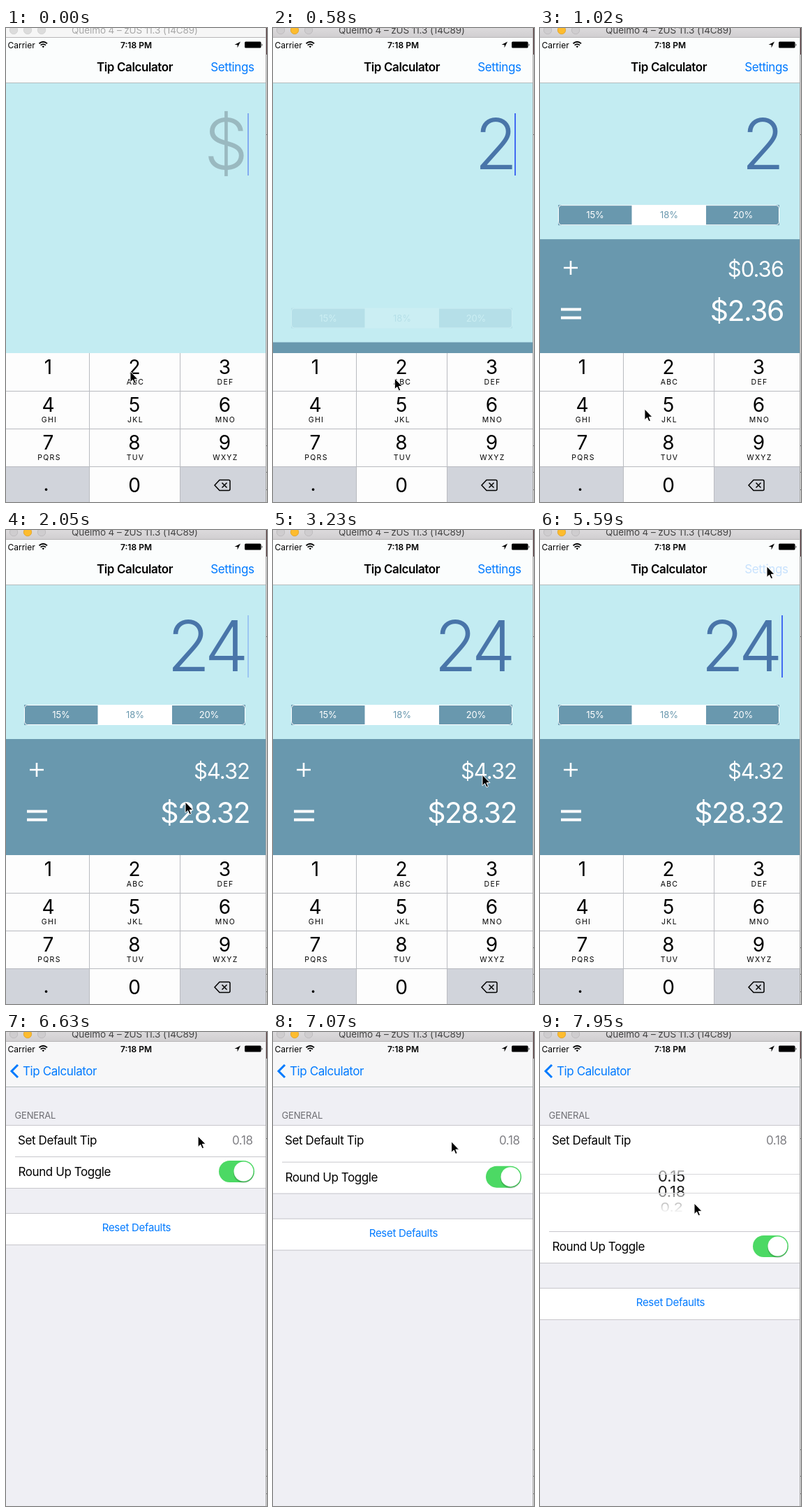
An HTML page that plays this animation: 374 px wide and 678 px high, repeating every 8 s.

```html
<!DOCTYPE html>
<html lang="en">
<head>
<meta charset="utf-8">
<title>Tip Calculator</title>
<style>
  html, body { margin: 0; width: 100%; height: 100%; overflow: hidden; background: #fff; }
  svg { display: block; width: 374px; height: 678px; }
  text {
    font-family: Inter, Roboto, "Liberation Sans", sans-serif;
    font-size: 17px; letter-spacing: -.41px;
    font-optical-sizing: none; white-space: pre;
  }
  .mid { text-anchor: middle; }
  .end { text-anchor: end; }
  .bold { font-weight: 600; }
  .blue { fill: #007aff; }
  .small { font-size: 12px; letter-spacing: 0; }
  .bar { font-size: 13.5px; letter-spacing: -.1px; }
  .bill { font-size: 100px; letter-spacing: -6px; font-weight: 350; fill: #4975a9; }
  .seg { font-size: 13px; letter-spacing: -.1px; fill: #fff; }
  .tip { font-size: 31px; letter-spacing: -1px; fill: #fff; }
  .total { font-size: 41px; letter-spacing: -1.5px; fill: #fff; }
  .digit { font-size: 28px; letter-spacing: 0; }
  .abc { font-size: 10.5px; letter-spacing: 1.3px; }
  .head { font-size: 13px; letter-spacing: -.15px; fill: #6d6d72; }
  .reset { font-size: 15px; letter-spacing: -.3px; }
  .wheel text { font-size: 22px; letter-spacing: -.2px; text-anchor: middle; }
  .hair { stroke: #c8c7cc; }
</style>
</head>
<body>
<svg viewBox="0 0 374 678">
  <defs>
    <clipPath id="screen"><rect y="14" width="372" height="664"/></clipPath>
    <clipPath id="panelClip"><rect id="panelMask" y="299" width="372" height="379"/></clipPath>
    <clipPath id="band"><rect y="204" width="372" height="27"/></clipPath>
    <linearGradient id="fadeTop" x2="0" y2="1">
      <stop offset=".3" stop-color="#fff"/><stop offset="1" stop-color="#fff" stop-opacity=".1"/>
    </linearGradient>
    <linearGradient id="fadeLow" x2="0" y2="1">
      <stop offset="0" stop-color="#fff" stop-opacity=".1"/><stop offset="1" stop-color="#fff"/>
    </linearGradient>
    <linearGradient id="chrome" x2="0" y2="1">
      <stop offset="0" stop-color="#dcdadc"/><stop offset="1" stop-color="#d0ced0"/>
    </linearGradient>
  </defs>

  <g clip-path="url(#screen)">
    <g id="calc">
      <rect y="79" width="372" height="599" fill="#c3ecf2"/>
      <text id="hint" class="bill end" x="341" y="202" style="fill:#9ab9c0">$</text>
      <text id="bill" class="bill" y="202"></text>
      <rect id="caret" x="346" y="122" width="2" height="89" fill="#426bf2"/>
      <g id="result">
        <rect id="panel" y="299" width="372" height="379" fill="#6998ae"/>
        <g id="segments">
          <rect x="26" y="250" width="317" height="29" fill="#6998ae"/>
          <rect x="131.5" y="250" width="106.5" height="29" fill="#fff"/>
          <rect x="26.5" y="250.5" width="316" height="28" rx="4" fill="none" stroke="#fff"/>
          <text class="seg mid" x="79" y="269">15%</text>
          <text class="seg mid" x="185" y="269" style="fill:#6998ae">18%</text>
          <text class="seg mid" x="291" y="269">20%</text>
        </g>
        <g clip-path="url(#panelClip)">
          <path d="M34 343H54M44 333V353" stroke="#fff" stroke-width="2.6"/>
          <path d="M30 402.5H59M30 414.5H59" stroke="#fff" stroke-width="4"/>
          <text id="tip" class="tip end" x="349" y="356"></text>
          <text id="total" class="total end" x="349" y="418.5"></text>
        </g>
      </g>
    </g>

    <g id="pad"></g>

    <g id="prefs">
      <rect y="79" width="372" height="599" fill="#efeff4"/>
      <text class="head" x="12.5" y="123.5">GENERAL</text>
      <rect y="133" width="372" height="200" fill="#fff"/>
      <path class="hair" d="M0 133.5H372"/>
      <text x="17" y="161">Set Default Tip</text>
      <text class="end" x="353.5" y="161" fill="#7f7f84">0.18</text>
      <g id="picker">
        <g class="wheel" fill="#777"></g>
        <rect y="178" width="372" height="26" fill="url(#fadeTop)"/>
        <rect y="231" width="372" height="29" fill="url(#fadeLow)"/>
        <rect y="260" width="372" height="25" fill="#fff"/>
        <g clip-path="url(#band)">
          <rect y="204" width="372" height="27" fill="#fff"/>
          <g class="wheel" fill="#1c1c1c"></g>
        </g>
        <path d="M0 203.5H372M0 230.5H372" stroke="#d8d8da"/>
      </g>
      <g id="lower">
        <rect y="178" width="372" height="45" fill="#fff"/>
        <rect y="223" width="372" height="455" fill="#efeff4"/>
        <rect y="260" width="372" height="44" fill="#fff"/>
        <path class="hair" d="M13 178.5H372M0 223.5H372M0 259.5H372M0 304.5H372"/>
        <text x="17.5" y="206">Round Up Toggle</text>
        <rect x="305" y="184" width="51" height="31" rx="15.5" fill="#4cd964"/>
        <circle cx="340.5" cy="201.5" r="14.5" fill="#000" opacity=".16"/>
        <circle cx="340.5" cy="199.5" r="14" fill="#fff"/>
        <text class="reset blue mid" x="187" y="285">Reset Defaults</text>
      </g>
    </g>

    <rect y="14" width="372" height="64" fill="#fbfdfd"/>
    <rect id="navGray" y="14" width="372" height="64" fill="#f7f7f8"/>
    <path d="M0 78.5H372" stroke="#b4bcbe"/>
    <g id="navMain">
      <text id="title" class="bold mid" x="184.5" y="62">Tip Calculator</text>
      <text id="settings" class="blue end" x="355.5" y="62">Settings</text>
    </g>
    <g id="navBack">
      <path d="M17 47 8 56 17 65" fill="none" stroke="#007aff" stroke-width="3"/>
      <text id="back" class="blue" x="24" y="62">Tip Calculator</text>
    </g>

    <text class="small" x="2.5" y="28.5">Carrier</text>
    <g fill="none" stroke="#000" stroke-width="1.8">
      <path d="M47.5 22.2Q53.3 17.4 59 22.2M49.6 24.6Q53.3 21.6 57 24.6"/>
      <path d="M51.6 26 53.3 28.4 55 26Q53.3 24.8 51.6 26Z" fill="#000" stroke="none"/>
    </g>
    <text class="small bold mid" x="186.5" y="28.5">7:18 PM</text>
    <path d="M336 19.5 327.5 24H331.6V28.2Z"/>
    <rect x="342" y="19.5" width="23.5" height="9" rx="1.5"/>
    <path d="M366.5 22.2Q368.4 24 366.5 26Z"/>
  </g>

  <rect id="barFill" width="372" height="13.5"/>
  <path d="M0 13.5H372" stroke="#b8b6b8"/>
  <g id="dots" stroke-width=".8">
    <circle cx="11" cy="3" r="5.7"/><circle cx="31" cy="3" r="5.7"/><circle cx="51" cy="3" r="5.7"/>
  </g>
  <text id="barText" class="bar mid" x="184.5" y="8">Quelmo 4 – zUS 11.3 (14C89)</text>

  <rect x="372" width="2" height="678" fill="#d4d4d4"/>
  <path d="M372.5 0V678" stroke="#a9a9a9"/>
  <path d="M373.5 0V38" stroke="#55373a"/>
  <path d="M373 152.5H374M373 597.5H374M373 635.5H374M373 660.5H374" stroke="#666"/>

  <path id="pointer" d="M0 0V15.6L3.6 12.3 6 17.8 8.5 16.7 6.2 11.4H11Z" stroke="#fff" stroke-width="1"/>
</svg>

<script>
const LOOP = 8000, TICK = 147.2;
const $ = id => document.getElementById(id);
const set = (el, attrs) => { for (const k in attrs) el.setAttribute(k, attrs[k]); };
const move = (id, x, y = 0) => set($(id), { transform: `translate(${x} ${y})` });
const show = (id, alpha) => set($(id), { opacity: alpha });

// Keypad
const LETTERS = ['', 'ABC', 'DEF', 'GHI', 'JKL', 'MNO', 'PQRS', 'TUV', 'WXYZ'];
const DIGIT_X = [60.5, 184, 313.5], LETTER_X = [62, 185.5, 314.5], LEFT = [0, 120, 250];
$('pad').innerHTML = '<rect y="465" width="372" height="213" fill="#fdfdfd"/>' +
  '<path d="M0 627H119V678H0ZM250 627H372V678H250Z" fill="#d1d4db"/>' +
  LETTERS.map((abc, i) => {
    const c = i % 3, y = 465 + 54 * Math.floor(i / 3);
    return `<rect id="key${i + 1}" x="${LEFT[c]}" y="${y}" width="${c < 2 ? 120 : 122}" height="54" fill="#d1d4db" opacity="0"/>
      <text class="digit mid" x="${DIGIT_X[c]}" y="${y + 30}">${i + 1}</text>
      <text class="abc mid" x="${LETTER_X[c]}" y="${y + 45}">${abc}</text>`;
  }).join('') +
  `<path d="M119.5 465V678M249.5 465V678M0 519.5H372M0 573.5H372M0 627.5H372" stroke="#b9bbc0"/>
  <text class="digit mid" x="57.5" y="662">.</text>
  <text class="digit mid" x="184" y="664">0</text>
  <path d="M299 654 306 646.5H319Q321 646.5 321 648.5V659.5Q321 661.5 319 661.5H306Z
    M309.5 650.5 316.5 657.5M316.5 650.5 309.5 657.5" fill="none" stroke="#000" stroke-width="1.5"/>`;

// Picker wheel
const wheels = [...document.querySelectorAll('.wheel')];
for (const w of wheels) w.innerHTML = ['0.15', '0.18', '0.2'].map(s => `<text y="8">${s}</text>`).join('');

// Tracks: [time, value, ...]
const POINTER = [
  [0, 178, 491], [440, 178, 491], [590, 174, 502], [880, 155, 538], [1020, 150, 545],
  [1170, 135, 552], [1470, 72, 566], [1610, 70, 567], [1760, 110, 540], [2050, 257, 389],
  [2200, 252, 394], [2400, 252, 394], [2640, 290, 385], [2850, 290, 385], [3230, 300, 350],
  [3420, 300, 350], [3820, 245, 394], [4120, 322, 350], [4260, 341, 339], [4410, 341, 300],
  [4560, 338, 223], [4860, 328, 82], [5000, 325, 54], [5580, 325, 52], [5800, 325, 52],
  [6180, 320, 70], [6480, 288, 133], [6615, 275, 149], [7070, 255, 157], [7370, 238, 190],
  [7660, 221, 234], [7930, 221, 245]];
const FIRST_CARET = [[0, .5], [150, .5], [290, 1], [590, 1], [880, 0]];
const BLINK = [[0, .52], [120, 0], [360, 0], [580, 1], [920, 1], [1000, .52]];
const RISE = [[440, 0], [1083, 1]];
const PUSH = [[5800, 0], [6340, 1]];
const EXPAND = [[6980, 0], [7380, 1]];
const ROLL = [[7660, 0], [7930, 11]];

function at(track, t) {
  const i = track.findIndex(k => k[0] > t);
  if (i < 0) return track[track.length - 1].slice(1);
  if (i === 0) return track[0].slice(1);
  const a = track[i - 1], b = track[i], f = (t - a[0]) / (b[0] - a[0]);
  return a.slice(1).map((v, n) => v + (b[n + 1] - v) * f);
}
const ease = p => p < .5 ? 2 * p * p : 1 - 2 * (1 - p) ** 2;
const eased = (track, t) => ease(at(track, t)[0]);
const during = (t, a, b) => +(t >= a && t < b);

function draw(t) {
  const typed = t < 430 ? '' : t < 1600 ? '2' : '24';
  const bill = +typed;

  // Window chrome
  const active = t >= 130;
  set($('barFill'), { fill: active ? 'url(#chrome)' : '#f6f6f6' });
  set($('barText'), { fill: active ? '#444' : '#a8a8a8' });
  [...$('dots').children].forEach((dot, i) => set(dot, active && i === 1
    ? { fill: '#fdbc2e', stroke: '#dfa023' }
    : { fill: active ? '#cfcdcf' : '#dcdcdc', stroke: active ? '#b9b7b9' : '#cfcfcf' }));

  // Bill and totals
  show('hint', +!typed);
  $('bill').textContent = typed;
  set($('bill'), { x: typed.length > 1 ? 231 : 289 });
  $('tip').textContent = '$' + (bill * .18).toFixed(2);
  $('total').textContent = '$' + (bill * 1.18).toFixed(2);
  show('caret', t < 1170 ? at(FIRST_CARET, t)[0] : at(BLINK, t % 1000)[0]);

  const rise = eased(RISE, t), drop = 166 * (1 - rise);
  show('result', +(rise > 0));
  show('segments', Math.min(1, rise * 1.5));
  move('segments', 0, drop);
  set($('panel'), { y: 299 + drop });
  set($('panelMask'), { y: 299 + drop });
  show('key2', during(t, 270, 430));
  show('key4', during(t, 1450, 1600));

  // Push to settings
  const push = eased(PUSH, t);
  move('calc', -112 * push);
  move('pad', -372 * push);
  move('prefs', 372 * (1 - push));
  show('navGray', push);
  show('navMain', 1 - push);
  show('navBack', push);
  move('title', -107 * push);
  move('back', 107 * (1 - push));
  show('settings', t >= 5430 ? .2 : 1);

  // Expanding picker row
  const open = eased(EXPAND, t), roll = at(ROLL, t)[0];
  move('lower', 0, 107 * open);
  show('picker', open);
  for (const w of wheels) [...w.children].forEach((item, i) => {
    const d = (i - 1) * 22 + roll;
    set(item, { transform: `translate(188.5 ${217.5 + d}) scale(1 ${Math.cos(d / 52)})` });
  });

  move('pointer', ...at(POINTER, t));
}

const start = performance.now();
function loop() {
  const t = (performance.now() - start) % LOOP;
  draw(Math.max(0, Math.floor((t + 15) / TICK) * TICK - 10));
  requestAnimationFrame(loop);
}
loop();
</script>
</body>
</html>
```
